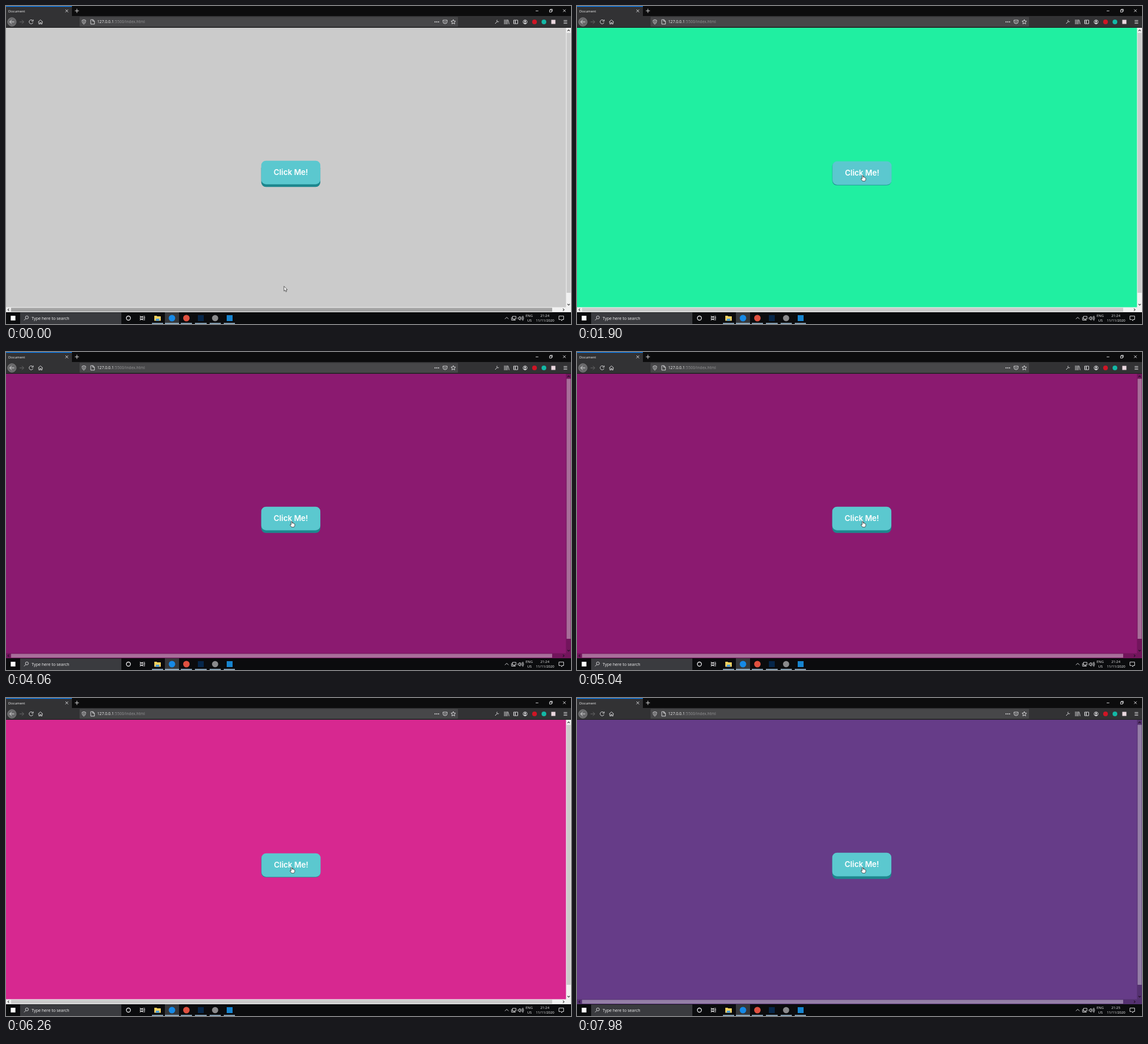
Animation, 960 px wide and 540 px high, one loop 8000 ms. Source, as an HTML page:

```html
<!DOCTYPE html>
<html lang="en">
<head>
<meta charset="utf-8">
<title>Document</title>
<style>
  html, body { margin: 0; width: 100%; height: 100%; overflow: hidden; background: #0c0c0d; }
  svg { display: block; width: 960px; height: 540px; }
  text { font-family: "Open Sans", "Noto Sans", sans-serif; fill: #f4f4f4; }
  .line { fill: none; stroke: #e4e4e6; stroke-width: .9; }
  .label { font: 600 13px Inter, sans-serif; fill: #fff; text-anchor: middle; }
  .mid { text-anchor: middle; font-size: 5.9px; }
</style>
</head>
<body>
<svg viewBox="0 0 960 540">
  <!-- tabs and toolbar -->
  <rect width="960" height="38" fill="#0c0c0d"/>
  <path d="M0 0H112V17H960V36.500H0Z" fill="#323234"/>
  <rect width="112" height="1.2" fill="#0a84ff"/>
  <text x="4" y="10.8" font-size="5.8">Document</text>
  <path class="line" d="M101 6l4.6 4.6M105.600 6l-4.600 4.600M117 8.200h7M120.500 4.700v7"/>
  <path class="line" d="M900 8.300h4.500M923.500 6.800h3.500v3.500h-3.500zM924.800 6.500v-1h3.500v3.500h-1M946.500 5.700l4.500 4.500M951 5.700l-4.500 4.500"/>
  <circle cx="10" cy="27" r="7.3" fill="#68686a" stroke="#88888a" stroke-width=".7"/>
  <path class="line" d="M14 27H6.500M9.800 23.500L6.300 27l3.500 3.500"/>
  <path class="line" style="stroke:#6c6c6e" d="M23 27h7M27 23.700l3.300 3.300-3.300 3.300"/>
  <path class="line" d="M45.500 25a3.400 3.400 0 1 0 .4 3M46.200 23v2.800h-2.800"/>
  <path class="line" d="M54.500 27.200l4-3.700 4 3.700M55.800 26.500v4h2v-2.500h1.500v2.500h2v-4"/>
  <rect x="125" y="18.500" width="643" height="16.500" rx="1" fill="#474749"/>
  <path class="line" d="M129.300 24.300l3-1 3 1c0 3.500-1 5.300-3 6.500-2-1.200-3-3-3-6.500zM132.300 24.700v4.300"/>
  <path class="line" d="M144 23.200h3.800l2.500 2.400v5.200H144zM147.500 23.200v2.700h2.700"/>
  <text x="155" y="29.400" font-size="6.700">127.0.0.1<tspan fill="#949496">:5500/index.html</tspan></text>
  <g fill="#e4e4e6"><circle cx="729" cy="27" r=".9"/><circle cx="732" cy="27" r=".9"/><circle cx="735" cy="27" r=".9"/></g>
  <path class="line" d="M742.500 24h7v2.500a3.500 3.500 0 0 1-7 0zM744.200 26l1.800 1.700 1.800-1.700"/>
  <path class="line" d="M760 23l1.100 2.500 2.700.3-2 1.900.5 2.700-2.300-1.400-2.300 1.400.5-2.700-2-1.900 2.700-.3z"/>
  <path class="line" d="M831 30l4-4M835 23.500a1.800 1.800 0 1 0 2.400 2.400"/>
  <path class="line" d="M847 23v8M849.300 23v8M851.500 23v8M853 23.300l1.800 7.500M862.500 24h7v6h-7zM865.500 24v6M863.500 26h1M863.500 28h1"/>
  <circle class="line" cx="882" cy="27" r="3.400"/>
  <path d="M880 28.500h4a2 2 0 0 1-4 0zM880.800 24.800h2.400v2.600h-2.400z" fill="#e4e4e6"/>
  <circle cx="898" cy="27" r="4" fill="#cf1525"/>
  <circle cx="914" cy="27" r="4" fill="#13b8a6"/>
  <rect x="926.500" y="23.500" width="7" height="7" fill="#ead8df"/>
  <path class="line" d="M947.500 24.500h6M947.500 27h6M947.500 29.500h6"/>

  <!-- page -->
  <rect id="page" y="37" width="960" height="483"/>
  <path id="track" d="M951.500 37H960V520H0V511.500H951.500Z"/>
  <path id="thumbY" d="M952.500 45.500h7v441.500h-7z"/>
  <path id="thumbX" d="M8.500 512.500H928v6.500H8.500z"/>
  <path id="arrows" fill="none" stroke-width="1.100" d="M954 42.500l2-2 2 2M954 506l2 2 2-2M5.200 513.800l-2 2 2 2M946.300 513.800l2 2-2 2"/>
  <rect id="base" x="433.700" width="100.400" height="40" rx="8" fill="#1d878e"/>
  <g id="face">
    <rect x="433.700" y="262.700" width="100.400" height="40" rx="8" fill="#5bc8cf"/>
    <text class="label" x="484" y="287">Click Me!</text>
  </g>

  <!-- taskbar -->
  <rect y="520" width="960" height="20" fill="#0b0c0e"/>
  <rect x="8" y="526" width="8" height="8" fill="#fff"/>
  <rect x="24" y="520.500" width="172" height="19.500" fill="#3a3b3f"/>
  <circle class="line" cx="35.500" cy="528.800" r="2.500"/>
  <path class="line" d="M33.700 530.700l-3 3"/>
  <text x="43.500" y="532.800" font-size="7" fill="#d2d2d4">Type here to search</text>
  <circle class="line" cx="208" cy="530" r="3.500" style="stroke-width:1.300"/>
  <path class="line" d="M228 526v1.500h5V526M228 528.800h5v2.500h-5zM228 534v-1.500h5v1.500M235.300 526v8M234.500 529.500h1.800"/>
  <rect x="270" y="520" width="24" height="20" fill="#36383b"/>
  <path d="M252 526h4l1 1h6v7.500h-11z" fill="#f6d260"/>
  <path d="M254.500 531h6v3.500h-6z" fill="#4a9edb"/>
  <circle cx="282" cy="530" r="5.500" fill="#1689e6"/>
  <circle cx="306.500" cy="530" r="5.500" fill="#df5140"/>
  <rect x="326" y="525" width="10" height="10" fill="#06264a"/>
  <circle cx="355.300" cy="530" r="5.300" fill="#8a8a8c"/>
  <rect x="375" y="525" width="10" height="10" fill="#1684cf"/>
  <path d="M248 539h19M270 539h24M297 539h19M321 539h20M346 539h19M370 539h19" stroke="#a9cce5" stroke-width="1.400"/>
  <path class="line" d="M847.800 531.500l3-3 3 3M860.500 527h6v4.500h-6zM859 528.500v5h4.500M863.500 531.500v2M862 533.500h4"/>
  <path class="line" d="M870 529h1.500l2-2v6.500l-2-2H870zM875 528.500q1.500 1.700 0 3.400M876.500 527.200q2.500 3 0 6M878 526q3 4.200 0 8.400"/>
  <text class="mid" x="889" y="528.300">ENG</text>
  <text class="mid" x="889.500" y="536.300">US</text>
  <text class="mid" id="clock" x="915.500" y="528.300">21:24</text>
  <text class="mid" x="916" y="536.300">11/11/2020</text>
  <path class="line" d="M939.500 526.500h8v6h-3v2l-2-2h-3z"/>

  <!-- pointers, tip at the origin -->
  <g id="pointer" stroke="#222" stroke-width=".7" stroke-linejoin="round" fill="#fff">
    <path id="arrow" d="M0 0V8.300L1.900 6.600 3.200 9.500 4.600 8.900 3.400 6.100H5.800Z"/>
    <path id="hand" d="M-.9.700Q0-.7.900.7V3.600Q2 0 2.500 3.800 3.600 3 4.100 4.300 5.400 4 5.400 5.400V7.500L4.200 10H-.2L-2.900 6.300Q-2.800 5-.9 6.300Z"/>
  </g>
</svg>
<script>
  const LOOP = 8000, RAMP = 50, MINUTE = 7300, HOVER_END = 150;
  const MOVE = { start: 20, end: 680, from: [472.3, 475.8], to: [485.3, 287.3] };
  // each click: press time, release time, colour shown from the release on
  const CLICKS = [
    [730, 850, '#a5a33b'],
    [1080, 1300, '#20efa1'],
    [1820, 2200, '#7af2ea'],
    [3240, 3900, '#8b1a70'],
    [5480, 5700, '#d72890'],
    [6180, 6700, '#663c88']
  ];
  const DARK = ['#8b1a70', '#663c88'];
  const $ = id => document.getElementById(id);
  const set = (id, attrs) => {
    for (const key in attrs) $(id).setAttribute(key, attrs[key]);
  };
  const clamp = v => Math.max(0, Math.min(1, v));
  const ease = p => p * p * (3 - 2 * p);

  function drawPage(t) {
    const done = CLICKS.filter(c => c[1] <= t).pop();
    const color = done ? done[2] : '#cbcbcb';
    const dark = DARK.includes(color);
    const thumb = dark ? { fill: '#fff', 'fill-opacity': .38 } : { fill: '#cbcbcb', 'fill-opacity': 1 };
    set('page', { fill: color });
    set('track', dark ? { fill: '#000', 'fill-opacity': .18 } : { fill: '#f1f1f1', 'fill-opacity': 1 });
    set('thumbY', thumb);
    set('thumbX', t < HOVER_END ? { fill: '#a3a3a3', 'fill-opacity': 1 } : thumb);
    set('arrows', { stroke: dark ? '#271029' : '#444' });
  }

  function drawButton(t) {
    const press = CLICKS.reduce((sum, [down, up]) =>
      sum + clamp((t - down) / RAMP) - clamp((t - up) / RAMP), 0);
    set('face', { transform: `translate(${press * .4} ${press})` });
    set('base', { y: 267.3 - 2.7 * press });
  }

  function drawPointer(t) {
    const p = ease(clamp((t - MOVE.start) / (MOVE.end - MOVE.start)));
    const [x, y] = MOVE.from.map((v, i) => v + (MOVE.to[i] - v) * p);
    const over = y < 307;
    set('pointer', { transform: `translate(${x} ${y})` });
    set('arrow', { visibility: over ? 'hidden' : 'visible' });
    set('hand', { visibility: over ? 'visible' : 'hidden' });
  }

  function frame(now) {
    const t = now % LOOP;
    drawPage(t);
    drawButton(t);
    drawPointer(t);
    $('clock').textContent = t < MINUTE ? '21:24' : '21:25';
    requestAnimationFrame(frame);
  }
  frame(performance.now());
</script>
</body>
</html>
```
